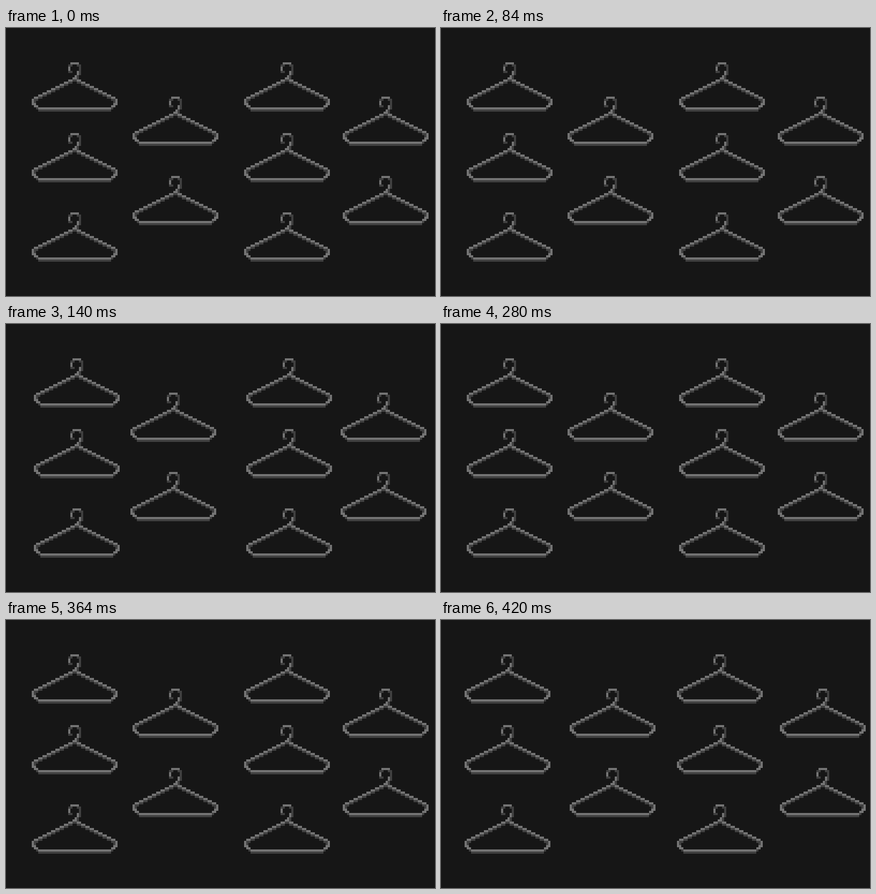
Recreate the animation shown at these times as an HTML page with a canvas. Size 800 by 500 pixels, loop 0.56 s.

```html
<!DOCTYPE html>
<html lang="en">
<head>
<meta charset="utf-8">
<title>Hangers</title>
<style>
  html, body { margin: 0; height: 100%; overflow: hidden; background: #161616; }
  canvas { display: block; }
</style>
</head>
<body>
<canvas id="stage" width="800" height="500"></canvas>
<script>
const ctx = document.getElementById('stage').getContext('2d');
const CELL = 4, STEP = 140;
const LIGHT = '#747474', DARK = '#404040';
const SWAY = [0, 1, 0, -1];

function cells(color, x, y, w = 1, h = 1) {
  ctx.fillStyle = color;
  ctx.fillRect(x * CELL, y * CELL, w * CELL, h * CELL);
}

// The same run of cells on both sides of the hanger, 40 cells wide
function pair(color, x, y, w = 1, h = 1) {
  cells(color, x, y, w, h);
  cells(color, 40 - x - w, y, w, h);
}

function hook() {
  cells(DARK, 17, 1, 2);
  cells(DARK, 17, 4, 2);
  cells(DARK, 21, 1);
  cells(DARK, 22, 1, 1, 5);
  cells(DARK, 21, 6, 1, 2);
  cells(LIGHT, 18, 0, 4);
  cells(LIGHT, 17, 2, 1, 2);
  cells(LIGHT, 21, 4, 1, 2);
  cells(LIGHT, 20, 6);
}

function hanger(x, y) {
  ctx.save();
  ctx.translate(x, y);
  hook();
  for (let k = 0; k < 10; k++) {
    const left = 19 - 2 * k;
    pair(DARK, left, 8 + k, 2);
    pair(LIGHT, left, 7 + k, 2);
  }
  pair(DARK, 1, 17, 1, 2);
  pair(DARK, 2, 21);
  pair(LIGHT, 0, 17, 1, 3);
  pair(LIGHT, 1, 19, 1, 2);
  pair(LIGHT, 2, 20);
  cells(LIGHT, 3, 21, 34);
  cells(DARK, 3, 22, 34);
  ctx.restore();
}

function draw(now) {
  const sway = SWAY[Math.floor(now / STEP) % 4] * CELL;
  ctx.fillStyle = '#161616';
  ctx.fillRect(0, 0, 800, 500);
  for (const x of [48, 444])
    for (const y of [64, 196, 344]) hanger(x + sway, y);
  for (const x of [236, 628])
    for (const y of [128, 276]) hanger(x - sway, y);
}

let start;
function tick(now) {
  start ??= now;
  draw(now - start);
  requestAnimationFrame(tick);
}
draw(0);
requestAnimationFrame(tick);
</script>
</body>
</html>
```
